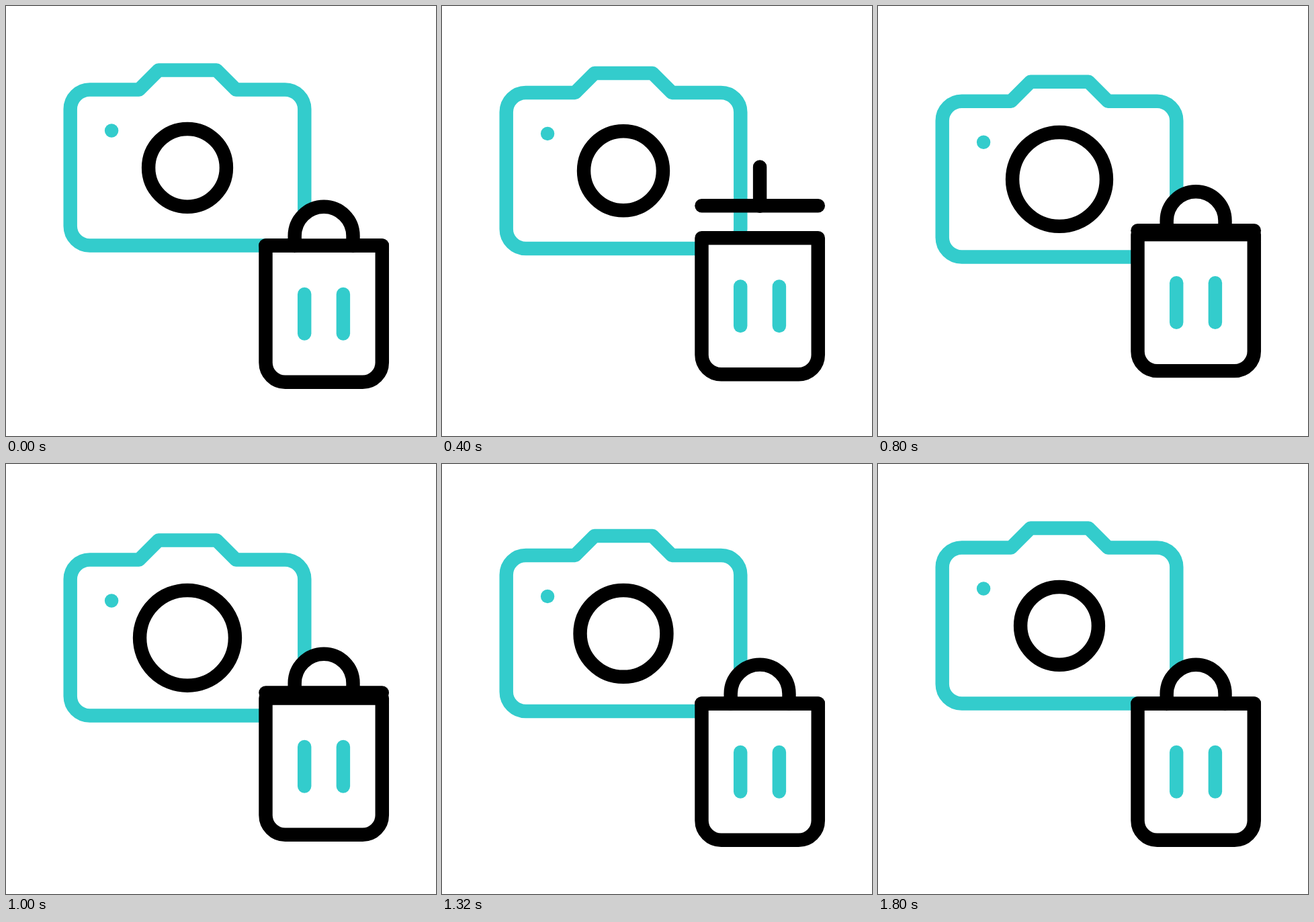
An HTML page with a canvas for the animation above (2 s loop, 640 by 640 pixels).

```html
<!DOCTYPE html>
<html lang="en">
<head>
<meta charset="utf-8">
<title>Camera and bin icon</title>
<style>
  html, body { margin: 0; width: 100%; height: 100%; overflow: hidden; background: #fff; }
  canvas { display: block; width: 100vw; height: 100vh; }
</style>
</head>
<body>
<canvas id="stage" width="640" height="640"></canvas>
<script>
const ctx = document.getElementById('stage').getContext('2d');
const LOOP = 2000, STEP = 40;
const TEAL = '#33cccc', BLACK = '#000', WHITE = '#fff';
const LINE = 20.46;

// Cubic bezier (.5, 0, .5, 1): solve x for the curve parameter, return y.
function ease(x) {
  let lo = 0, hi = 1;
  for (let i = 0; i < 24; i++) {
    const s = (lo + hi) / 2;
    if (1.5 * s * (1 - s) + s * s * s < x) lo = s; else hi = s;
  }
  return lo * lo * (3 - 2 * lo);
}

// Keys are [time, value] pairs.
function track(t, keys) {
  if (t <= keys[0][0]) return keys[0][1];
  for (let i = 1; i < keys.length; i++) {
    const [t0, v0] = keys[i - 1], [t1, v1] = keys[i];
    if (t < t1) return v0 + (v1 - v0) * ease((t - t0) / (t1 - t0));
  }
  return keys[keys.length - 1][1];
}

const motion = {
  camera: [[80, 0], [960, 18.1], [1800, 0]],
  lens: [[240, 57.9], [960, 71], [1680, 57.9]],
  bin: [[60, 0], [660, -18], [1300, 0]],
  lid: [[80, 0], [400, -59.2], [560, -59.2], [880, -18], [1345, 0]],
  handle: [[120, 43.4], [400, 0], [676, 43.4]]
};

function shape(color, build, fill) {
  ctx.beginPath();
  build();
  if (fill) {
    ctx.fillStyle = fill;
    ctx.fill();
  }
  ctx.strokeStyle = color;
  ctx.stroke();
}

function line(color, x0, y0, x1, y1) {
  shape(color, () => {
    ctx.moveTo(x0, y0);
    ctx.lineTo(x1, y1);
  });
}

function shifted(dy, draw) {
  ctx.save();
  ctx.translate(0, dy);
  draw();
  ctx.restore();
}

function drawCamera(lensRadius) {
  const left = 95.7, right = 444.3, top = 124.5, bottom = 356.4, r = 29;
  shape(TEAL, () => {
    ctx.moveTo(198, top);
    ctx.lineTo(227, 95.5);
    ctx.lineTo(313.3, 95.5);
    ctx.lineTo(342.3, top);
    ctx.arcTo(right, top, right, bottom, r);
    ctx.arcTo(right, bottom, left, bottom, r);
    ctx.arcTo(left, bottom, left, top, r);
    ctx.arcTo(left, top, right, top, r);
    ctx.closePath();
  });
  line(TEAL, 157.1, 185.5, 157.1, 185.51);
  shape(BLACK, () => ctx.arc(270, 240.8, lensRadius, 0, Math.PI * 2));
}

function drawBin() {
  const left = 386.5, right = 559.8, top = 356.5, bottom = 559.7, r = 29;
  shape(BLACK, () => {
    ctx.moveTo(left, top);
    ctx.lineTo(right, top);
    ctx.arcTo(right, bottom, left, bottom, r);
    ctx.arcTo(left, bottom, left, top, r);
    ctx.closePath();
  }, WHITE);
  for (const x of [444.2, 501.9]) line(TEAL, x, 428.9, x, 487.4);
}

function drawLid(rx) {
  const cx = 473.1, cy = 342.1, foot = 356.9;
  shape(BLACK, () => {
    ctx.moveTo(cx - rx, foot);
    ctx.lineTo(cx - rx, cy);
    ctx.ellipse(cx, cy, rx, 43.4, 0, Math.PI, Math.PI * 2);
    ctx.lineTo(cx + rx, foot);
  }, WHITE);
  line(BLACK, 386.5, 356.5, 559.8, 356.5);
}

function draw(t) {
  const at = name => track(t, motion[name]);
  ctx.fillStyle = WHITE;
  ctx.fillRect(0, 0, 640, 640);
  ctx.lineWidth = LINE;
  ctx.lineCap = ctx.lineJoin = 'round';
  shifted(at('camera'), () => drawCamera(at('lens')));
  shifted(at('bin'), drawBin);
  shifted(at('lid'), () => drawLid(at('handle')));
}

function tick() {
  const t = performance.now() % LOOP;
  draw(Math.floor(t / STEP) * STEP);
  requestAnimationFrame(tick);
}
tick();
</script>
</body>
</html>
```
